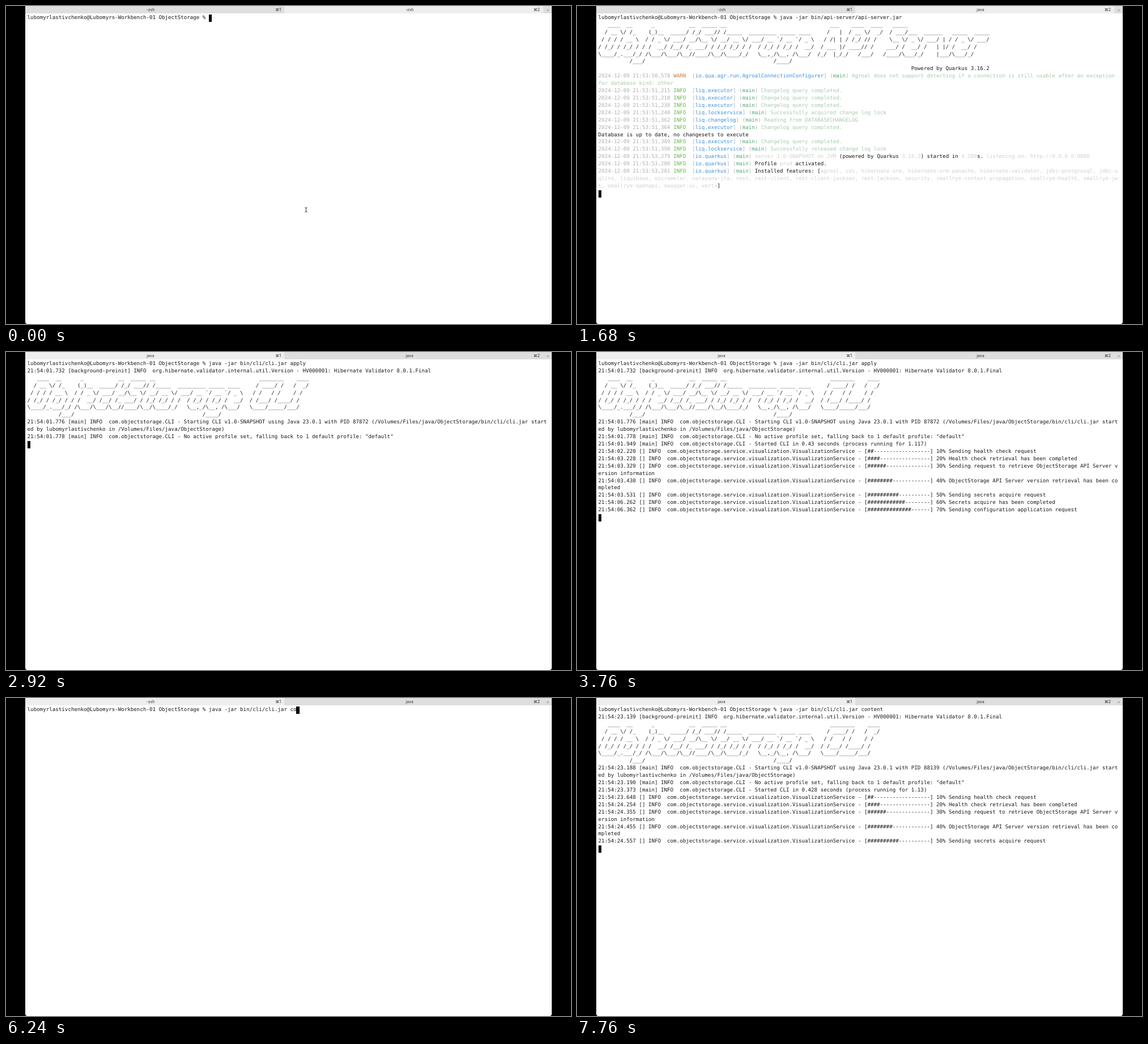
Recreate the animation shown at these times as an HTML page. Size 997 by 561 pixels, loop 8000 ms.

```html
<!DOCTYPE html>
<html lang="en">
<head>
<meta charset="utf-8">
<title>Terminal session</title>
<style>
html, body { margin: 0; width: 100%; height: 100%; overflow: hidden; background: #000; }
#win { position: absolute; left: 34px; top: 0; width: 929px; height: 561px; background: #fff; border-radius: 0 0 4px 4px; overflow: hidden; }
#bar { position: absolute; inset: 0 0 auto; height: 13px; background: #dededd; font: 7px/13px Inter, "DejaVu Sans", sans-serif; color: #333; }
.tab { position: absolute; top: 0; height: 13px; width: 457px; }
.tab.on { background: #eee; }
.tab b { position: absolute; left: 0; width: 442px; text-align: center; font-weight: 400; }
.tab u { position: absolute; right: 6px; text-decoration: none; color: #222; }
#plus { position: absolute; left: 915px; width: 14px; text-align: center; font-size: 10px; color: #999; }
pre { position: absolute; left: 3.6px; top: 15px; margin: 0; color: #1a1a1a; white-space: pre;
  font: 9.187px/12.9px "DejaVu Sans Mono", monospace; text-rendering: geometricPrecision; font-variant-ligatures: none; }
pre i { display: inline-block; vertical-align: top; width: 1ch; height: 12.9px; background: #000; }
.date { color: #b0b0b0; } .warn { color: #c4823f; } .info { color: #5fb544; } .name { color: #3f92d8; }
.main { color: #4fa876; } .msg { color: #a6cbad; } .dim { color: #d0d0d0; }
svg { position: absolute; left: 490px; top: 354px; fill: none; stroke: #333; }
</style>
</head>
<body>
<div id="win">
  <div id="bar">
    <div class="tab" style="left:0"><b></b><u>⌘1</u></div>
    <div class="tab" style="left:457px"><b></b><u>⌘2</u></div>
    <div id="plus">+</div>
  </div>
  <pre></pre>
  <svg width="11" height="11"><path d="M3.5 1.5q2 0 2 1.5v5q0 1.5-2 1.5M7.5 1.5q-2 0-2 1.5M5.5 8q0 1.5 2 1.5"/></svg>
</div>
<script>
const LOOP = 8000;
const USER = "lubomyrlastivchenko";
const PROMPT = USER + "@Lubomyrs-Workbench-01 ObjectStorage % ";

// Banner lettering; ' stands for a backtick
const rows = text => text.replaceAll("'", "`").split("\n").slice(1, -1);
const STORAGE = rows(String.raw`
   ____  __      _           __  _____ __
  / __ \/ /_    (_)__  _____/ /_/ ___// /_____  _________ _____ ____
 / / / / __ \  / / _ \/ ___/ __/\__ \/ __/ __ \/ ___/ __ '/ __ '/ _ \
/ /_/ / /_/ / / /  __/ /__/ /_ ___/ / /_/ /_/ / /  / /_/ / /_/ /  __/
\____/_.___/_/ /\___/\___/\__//____/\__/\____/_/   \__,_/\__, /\___/
          /___/                                         /____/
`);
const API = rows(String.raw`
    ___    ____  ____   _____
   /   |  / __ \/  _/  / ___/___  ______   _____  _____
  / /| | / /_/ // /    \__ \/ _ \/ ___/ | / / _ \/ ___/
 / ___ |/ ____// /    ___/ /  __/ /   | |/ /  __/ /
/_/  |_/_/   /___/   /____/\___/_/    |___/\___/_/
`);
const CLI = rows(String.raw`
   ________    ____
  / ____/ /   /  _/
 / /   / /    / /
/ /___/ /____/ /
\____/_____/___/
`);
const banner = (word, col) =>
  STORAGE.map((row, i) => row.padEnd(col) + (word[i] || "") + "\n").join("");

const tint = (cls, text) => `<span class="${cls}">${text}</span>`;
const dim = text => tint("dim", text);
const msg = text => tint("msg", text);

function serverLog(time, logger, body, level = "INFO") {
  return tint("date", "2024-12-09 21:53:" + time) + " " + tint(level.toLowerCase(), level) +
    "  " + tint("date", "[") + tint("name", logger) + tint("date", "] (") +
    tint("main", "main") + tint("date", ") ") + body + "\n";
}
const query = time => serverLog(time, "liq.executor", msg("Changelog query completed."));

const SERVER = [
  [1000, "\n"],
  [1280, banner(API, 70) + " ".repeat(100) + "Powered by Quarkus 3.16.2\n"],
  [1320, serverLog("50,578", "io.qua.agr.run.AgroalConnectionConfigurer",
    msg("Agroal does not support detecting if a connection is still usable after an exception\nfor database kind: other"), "WARN")],
  [1380, query("51,215") + query("51,218") + query("51,238") +
    serverLog("51,240", "liq.lockservice", msg("Successfully acquired change log lock"))],
  [1400, serverLog("51,362", "liq.changelog", msg("Reading from DATABASECHANGELOG")) + query("51,364")],
  [1420, "Database is up to date, no changesets to execute\n" + query("51,389") +
    serverLog("51,390", "liq.lockservice", msg("Successfully released change log lock"))],
  [1670, serverLog("53,279", "io.quarkus", dim("server 1.0-SNAPSHOT on JVM") + " (powered by Quarkus " +
      dim("3.16.2") + ") started in " + dim("4.289") + "s. " + dim("listening on: http://0.0.0.0:8086")) +
    serverLog("53,280", "io.quarkus", "Profile " + dim("prod") + " activated.") +
    serverLog("53,281", "io.quarkus", "Installed features: [" +
      dim("agroal, cdi, hibernate-orm, hibernate-orm-panache, hibernate-validator, jdbc-postgresql, jdbc-s\n" +
        "qlite, liquibase, micrometer, narayana-jta, rest, rest-client, rest-client-jackson, rest-jackson, security, smallrye-context-propagation, smallrye-health, smallrye-jw\n" +
        "t, smallrye-openapi, swagger-ui, vertx") + "]")],
];

const STEPS = [
  "Sending health check request",
  "Health check retrieval has been completed",
  "Sending request to retrieve ObjectStorage API Server v\nersion information",
  "ObjectStorage API Server version retrieval has been co\nmpleted",
  "Sending secrets acquire request",
  "Secrets acquire has been completed",
  "Sending configuration application request",
  "Configuration application has been completed",
];

// times: when each line appears; stamps: the clock printed in front of it
function cliRun(enter, times, stamps, pid, took) {
  const head = [
    `[background-preinit] INFO  org.hibernate.validator.internal.util.Version - HV000001: Hibernate Validator 8.0.1.Final\n` + banner(CLI, 71),
    `[main] INFO  com.objectstorage.CLI - Starting CLI v1.0-SNAPSHOT using Java 23.0.1 with PID ${pid} (/Volumes/Files/java/ObjectStorage/bin/cli/cli.jar start\ned by ${USER} in /Volumes/Files/java/ObjectStorage)\n`,
    `[main] INFO  com.objectstorage.CLI - No active profile set, falling back to 1 default profile: "default"\n`,
    `[main] INFO  com.objectstorage.CLI - Started CLI in ${took})\n`,
  ];
  const steps = STEPS.map((text, i) =>
    "[] INFO  com.objectstorage.service.visualization.VisualizationService - [" +
    "#".repeat(2 * i + 2).padEnd(20, "-") + `] ${i + 1}0% ${text}\n`);
  const lines = [...head, ...steps];
  return [[enter, "\n"], ...times.map((at, i) => [at, `21:54:${stamps[i]} ${lines[i]}`])];
}

const APPLY = cliRun(2760,
  [2880, 2920, 2920, 2960, 3000, 3120, 3160, 3200, 3240, 3600, 3600, 4360],
  "01.732 01.776 01.778 01.949 02.220 03.228 03.329 03.430 03.531 06.262 06.362 11.874".split(" "),
  87872, "0.43 seconds (process running for 1.117");
const CONTENT = cliRun(6640,
  [7080, 7160, 7160, 7240, 7360, 7640, 7680, 7720, 7760],
  "23.139 23.188 23.190 23.373 23.648 24.254 24.355 24.455 24.557".split(" "),
  88139, "0.428 seconds (process running for 1.13");

const shown = (t, items) => items.filter(([at]) => at <= t).map(item => item[1]).join("");

// keys: [time, characters typed so far], linear in between
function typed(t, text, keys) {
  const next = keys.findIndex(([at]) => at > t);
  if (next === 0) return "";
  if (next < 0) return text;
  const [t0, n0] = keys[next - 1], [t1, n1] = keys[next];
  return text.slice(0, Math.floor(n0 + (n1 - n0) * (t - t0) / (t1 - t0) + 1e-6));
}

function serverScreen(t) {
  return PROMPT + typed(t, "java -jar bin/api-server/api-server.jar", [[510, 0], [960, 39]]) +
    shown(t, SERVER);
}

function cliScreen(t) {
  if (t < 4760) {
    return PROMPT + typed(t, "java -jar bin/cli/cli.jar apply", [[2100, 0], [2720, 31]]) +
      shown(t, APPLY) + (t >= 4440 ? PROMPT + typed(t, "clear", [[4520, 0], [4700, 5]]) : "");
  }
  return PROMPT + typed(t, "java -jar bin/cli/cli.jar content",
    [[4800, 0], [5000, 7], [5079, 7], [5160, 9], [5200, 9], [5640, 16], [5760, 16], [6240, 28], [6520, 33]]) +
    shown(t, CONTENT);
}

const pre = document.querySelector("pre");
const beam = document.querySelector("svg");
const tabs = [...document.querySelectorAll(".tab")];
let last = "";

function draw() {
  const t = performance.now() % LOOP;
  const active = t < 1840 ? 1 : 0;
  const busy = [(t >= 2760 && t < 4440) || t >= 6640, t >= 1000];
  tabs.forEach((tab, i) => {
    tab.classList.toggle("on", i === active);
    tab.firstChild.textContent = busy[i] ? "java" : "-zsh";
  });
  beam.style.display = t < 520 ? "" : "none";
  const html = (active ? serverScreen(t) : cliScreen(t)) + "<i></i>";
  if (html !== last) pre.innerHTML = last = html;
  requestAnimationFrame(draw);
}
draw();
</script>
</body>
</html>
```
